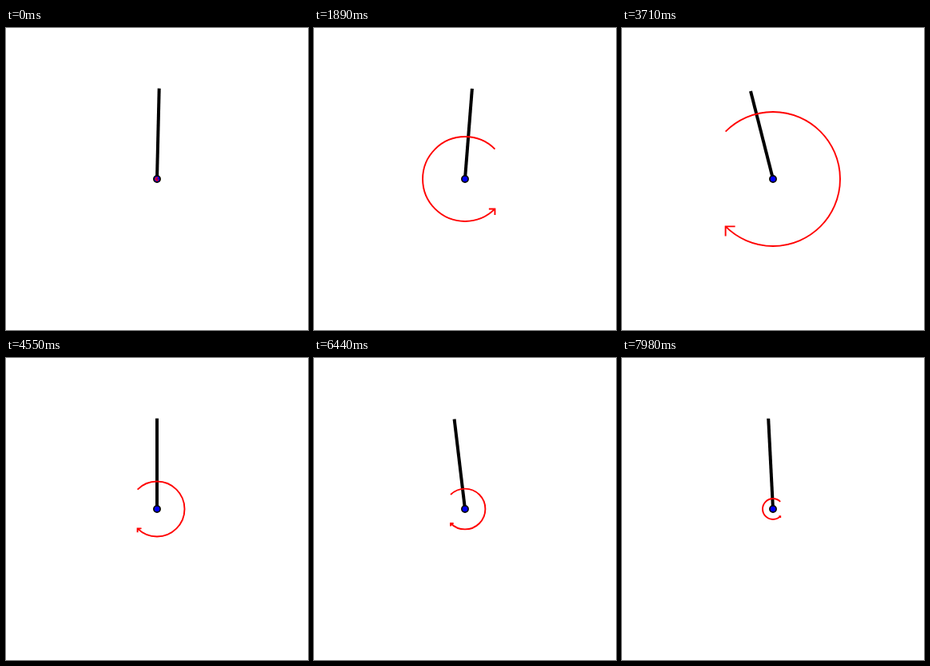
Write an HTML page that moves like this. It is 378 px wide and 378 px high and loops after 8000 ms.

```html
<!DOCTYPE html>
<html lang="en">
<head>
<meta charset="utf-8">
<title>Balancing pendulum</title>
<style>
  html, body { margin: 0; width: 100%; height: 100%; overflow: hidden; background: #fff; }
  svg { display: block; width: 100%; height: 100%; }
</style>
</head>
<body>
<svg viewBox="0 0 378 378">
  <g transform="translate(189 189)">
    <line id="rod" stroke="#000" stroke-width="4"/>
    <circle r="4.1" fill="#00f" stroke="#000" stroke-width="1.7"/>
    <path id="torque" fill="none" stroke="#f00" stroke-width="1.9"/>
  </g>
</svg>
<script>
const LOOP = 8000, STEP = 70, LENGTH = 113.4;
const TILT_PER_TORQUE = -0.25;
const rod = document.getElementById('rod');
const torque = document.getElementById('torque');

// Key poses: tip offset, torque (clockwise is positive),
// and the extra torque of the swing that follows
const poses = [
  { at: 0, tip: 2.7, turn: -1.6, swing: -45 },
  { at: 1190, tip: 3.2, turn: 7.6, swing: -52 },
  { at: 2660, tip: -12.4, turn: -11.5, swing: 35 },
  { at: 3710, tip: -28, turn: 84, swing: 0 },
  { at: 4550, tip: 0, turn: 34.5, swing: -80 },
  { at: 6440, tip: -13.4, turn: 25.4, swing: 74 },
  { at: 7980, tip: -5.8, turn: -13, swing: 0 }
];

const mix = (a, b, k) => a + (b - a) * k;

// Ease between poses; each swing tilts the rod against its torque
function poseAt(time) {
  const next = Math.max(1, poses.findIndex(p => p.at >= time));
  const a = poses[next - 1], b = poses[next];
  const k = (time - a.at) / (b.at - a.at);
  const ease = (1 - Math.cos(Math.PI * k)) / 2;
  const swing = a.swing * Math.sin(Math.PI * k) ** 2;
  return {
    tip: mix(a.tip, b.tip, ease) + swing * TILT_PER_TORQUE,
    turn: mix(a.turn, b.turn, ease) + swing
  };
}

// Three-quarter arc with an open arrowhead, mirrored for negative torque
function arcPath(turn) {
  const side = turn < 0 ? -1 : 1;
  const r = Math.abs(turn);
  const x = -side * r * Math.SQRT1_2;
  const y = r * Math.SQRT1_2;
  const head = r / 7;
  return `M${x} ${-y}A${r} ${r} 0 1 ${side > 0 ? 1 : 0} ${x} ${y}` +
    `M${x + side * head} ${y}H${x}V${y + head}`;
}

function draw(now) {
  const { tip, turn } = poseAt(Math.floor(now % LOOP / STEP) * STEP);
  rod.setAttribute('x2', tip);
  rod.setAttribute('y2', -Math.sqrt(LENGTH ** 2 - tip ** 2));
  torque.setAttribute('d', arcPath(turn));
}

const start = performance.now();
function tick() {
  draw(performance.now() - start);
  requestAnimationFrame(tick);
}
tick();
</script>
</body>
</html>
```
